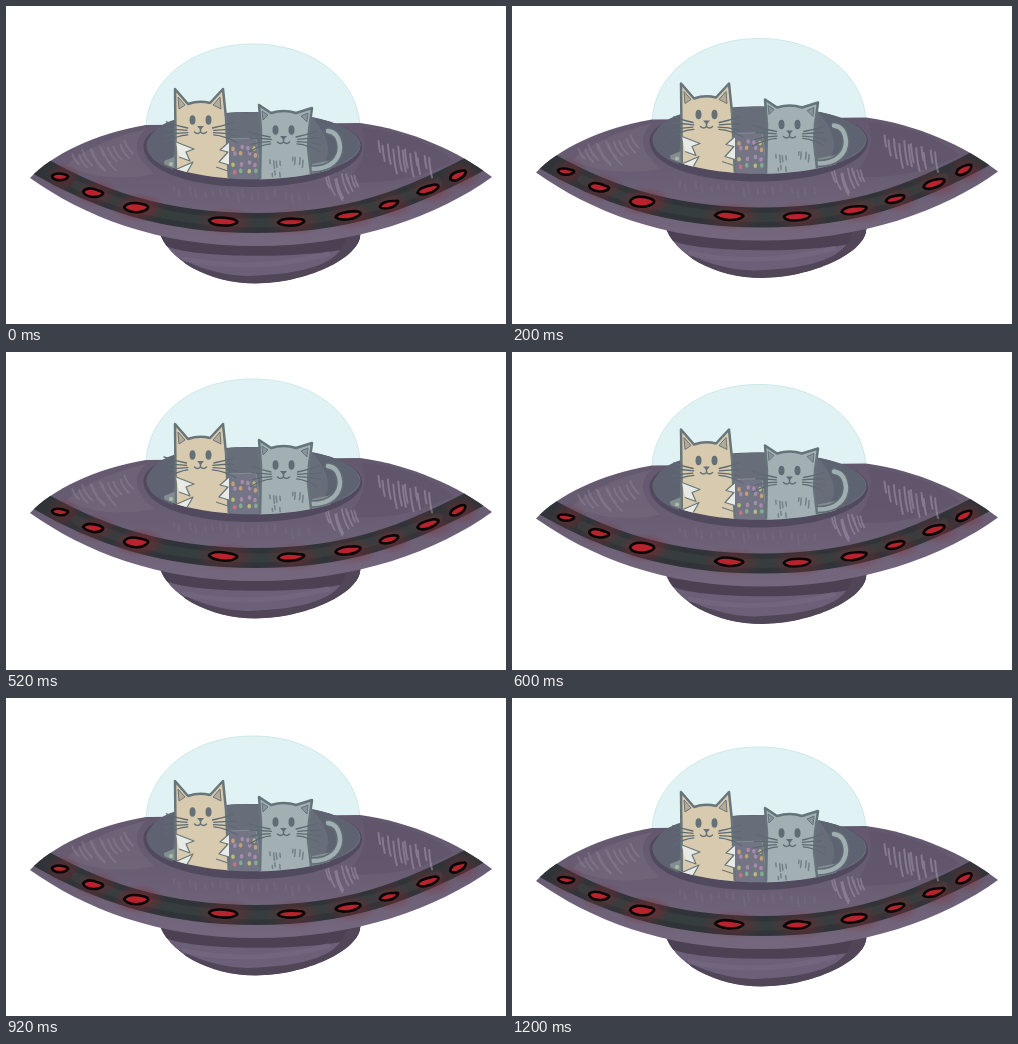
Write an HTML page that moves like this. It is 500 by 318 pixels and loops after 1.4 s.

```html
<!DOCTYPE html>
<html lang="en">
<head>
<meta charset="utf-8">
<title>Cats in a saucer</title>
<style>
  html, body { margin: 0; width: 100%; height: 100%; overflow: hidden; background: #fff; }
  svg { display: block; width: 100%; height: 100%; }
  .line { fill: none; stroke-linecap: round; stroke-linejoin: round; }
</style>
</head>
<body>
<svg viewBox="0 0 500 318">
  <defs>
    <linearGradient id="skin" x1="0" y1="0" x2="0" y2="1">
      <stop offset="0" stop-color="#63586d"/>
      <stop offset=".5" stop-color="#6a5e74"/>
      <stop offset="1" stop-color="#75687e"/>
    </linearGradient>
    <radialGradient id="glow">
      <stop offset="0" stop-color="#a01f27" stop-opacity=".75"/>
      <stop offset=".45" stop-color="#8c252d" stop-opacity=".45"/>
      <stop offset="1" stop-color="#7a2b35" stop-opacity="0"/>
    </radialGradient>
    <path id="disc" d="M24 172C45 149 90 127 140 119L354 117C405 124 452 145 486 171C432 210 350 240 250 240C150 240 78 210 24 172Z"/>
    <path id="hull" d="M153 225C161 254 203 277.500 250 277.500C300 277.500 359 251 354 225Z"/>
    <clipPath id="inDisc"><use href="#disc"/></clipPath>
    <clipPath id="inHull"><use href="#hull"/></clipPath>
    <clipPath id="inPit"><path d="M138 30H356V139.500A107 33.500 0 0 1 140 139.500Z"/></clipPath>
  </defs>
  <g id="ship">
    <path d="M140 124C140 75 186 38 247 38S354 75 354 124L350 140H144Z" fill="#e1f2f5" stroke="#cde9e9"/>

    <g clip-path="url(#inHull)">
      <use href="#hull" fill="#6c5f78"/>
      <path d="M150 222H358V238C322 253 185 254 158 239Z" fill="#4b4153"/>
      <path d="M340 232C334 258 300 268 242 270C212 269 188 260 174 252C190 273 220 282 250 281C310 280 358 255 356 225Z" fill="#504658"/>
      <path class="line" d="M178 253Q250 267 322 248" stroke="#776a82" stroke-width="5" opacity=".6"/>
    </g>

    <use href="#disc" fill="url(#skin)"/>
    <g clip-path="url(#inDisc)">
      <path d="M60 160Q85 136 140 123Q118 142 148 168Q100 178 60 160Z" fill="#776b7f" opacity=".55"/>
      <path d="M356 121Q420 130 448 155Q400 180 340 176Q366 150 356 121Z" fill="#5d5268" opacity=".55"/>
      <path class="line" d="M20 152C90 195 160 217 250 217S400 196 482 151" stroke="#303438" stroke-width="20"/>
      <path class="line" d="M70 179C125 206 190 217 250 217S382 201 432 177" stroke="#394443" stroke-width="9" opacity=".6"/>
      <g id="glows"></g>
    </g>
    <g id="shine" class="line" stroke="#a198aa"></g>

    <path d="M137.500 140C137.500 119 190 106 246 106S356 119 356 141C356 163 306 181 246 181S137.500 166 137.500 140Z" fill="#514a5e"/>
    <ellipse cx="247.500" cy="139.500" rx="107" ry="33.500" fill="#686d7a"/>
    <path d="M141 139C144 123 160 114 184 110Q166 129 167 164Q140 154 141 139Z" fill="#5f6271"/>
    <path d="M306 111Q351 120 354 140Q348 157 308 167Q337 147 306 111Z" fill="#5e6371"/>

    <g clip-path="url(#inPit)">
      <path d="M221 133L250 132L256 176H220Z" fill="#737484" stroke="#848c94"/>
      <path d="M158 155L173 149V174H160ZM306 158L326 154L322 174H304Z" fill="#848e91"/>
      <g id="knobs"></g>

      <path class="line" d="M306 163C326 163 334 152 334 141C333 130 329 126 322 125" stroke="#606c73" stroke-width="7.500"/>
      <path class="line" d="M306 163C326 163 334 152 334 141C333 130 329 126 322 125" stroke="#a0aeb1" stroke-width="4.500"/>

      <g stroke="#68757a" stroke-width="2.500" stroke-linejoin="round">
        <path d="M170 176L169 83L182 98Q193 94 204 97L217 83L220 112L223 176Z" fill="#d8caae"/>
        <path d="M172 91L179 99L173 103ZM214 91L207 99L215 103Z" fill="#b3aa9b" stroke-width="1"/>
        <path d="M170 136L188 143L180 146L184 155L173 151M223 136L214 144L222 146L213 156L223 159" fill="#e8ebe5" stroke-width="1.200"/>
        <path d="M171 163L187 156L179 170M222 165L210 161" fill="#e8ebe5" stroke-width="1.200"/>
      </g>
      <g stroke="#65747a" stroke-width="2.500" stroke-linejoin="round">
        <path d="M254 176L255 124L253 99L265 107Q278 103 290 107L306 102L303 124L302 142L306 176Z" fill="#a2b0b3"/>
        <path d="M256 105L262 109L257 114ZM302 107L295 110L301 116Z" fill="#85949a" stroke-width="1"/>
      </g>
      <g id="faces"></g>
      <path class="line" id="fur" stroke="#738287" stroke-width="1.500"/>
    </g>
    <path class="line" id="whiskers" stroke="#5d6a72" stroke-width="1.300"/>
    <g id="lamps"></g>
  </g>
</svg>
<script>
const el = id => document.getElementById(id);
const STEP = 200, STEPS = 7, RISE = 5.5;
// x, y, half width, half height, tilt
const lamps = [
  [54, 171, 8, 3.2, 4], [87, 187, 10, 3.9, 8], [130, 201.5, 12, 4.7, 2],
  [217, 215.5, 14, 4, 4], [285, 216, 13, 3.7, -3], [342, 209.5, 12.5, 3.8, -8],
  [383, 198.5, 9.5, 3.4, -14], [422, 183.5, 11, 3.7, -17], [452, 169.5, 8.5, 3.7, -27]
];

function random(seed) {
  return () => {
    seed = (seed * 16807) % 2147483647;
    return seed / 2147483647;
  };
}

function hatch(x, y, count, dx, dy, length, lean, seed) {
  const r = random(seed);
  let marks = "";
  for (let i = 0; i < count; i++) {
    const size = length * (.5 + r() * .6);
    const px = x + dx * i + r() * 4, py = y + dy * i + r() * 5;
    marks += `M${px} ${py}q${lean * size * .3} ${size * .6} ${lean * size} ${size}`;
  }
  return marks;
}

function face(x, y, color) {
  return `<g fill="${color}">
    <ellipse cx="${x - 8}" cy="${y}" rx="3" ry="4.700"/>
    <ellipse cx="${x + 8}" cy="${y}" rx="3" ry="4.700"/>
    <path d="M${x - 3.5} ${y + 6}h7l-3.500 4z"/></g>
    <path class="line" stroke="${color}" stroke-width="1.500"
      d="M${x} ${y + 9}v3q-3 3 -6 0m6 0q3 3 6 0"/>`;
}

function drawFixed() {
  el("glows").innerHTML = lamps.map(([x, y, w], i) =>
    `<ellipse cx="${x + 3}" cy="${y}" rx="${w * 2.3}" ry="15" fill="url(#glow)" opacity="${i === 2 ? 1 : .65}"/>`).join("");
  el("shine").innerHTML =
    `<path d="${hatch(66, 146, 11, 5, -1.2, 20, .65, 31)}" stroke-width="2" opacity=".28"/>
     <path d="${hatch(372, 134, 12, 4.4, 1.5, 22, .15, 77)}" stroke-width="2" opacity=".55"/>
     <path d="${hatch(318, 170, 9, 3.8, -.5, 20, .35, 19)}" stroke-width="1.800" opacity=".5"/>
     <path d="${hatch(164, 181, 18, 8, .2, 9, .1, 53)}" stroke-width="2" opacity=".1"/>`;

  const r = random(91), colors = ["#c77482", "#b7bd76", "#7fae90", "#c2a077", "#a78bac"];
  let knobs = "";
  for (let i = 0; i < 16; i++) {
    knobs += `<ellipse cx="${227 + i % 4 * 7 + r() * 3}" cy="${139 + Math.floor(i / 4) * 8 + r() * 4}"
      rx="1.800" ry="2.300" fill="${colors[Math.floor(r() * 5)]}"/>`;
  }
  el("knobs").innerHTML = knobs + '<circle cx="319" cy="163" r="2" fill="#b7bd76"/><circle cx="165" cy="158" r="2" fill="#a9bda5"/>';
  el("faces").innerHTML = face(194.5, 114, "#667177") + face(277.5, 124, "#5e6d75");
  el("fur").setAttribute("d", hatch(261, 150, 4, 3, .5, 7, .1, 13) +
    hatch(286, 147, 4, 3, 1, 7, -.1, 17) + hatch(263, 163, 3, 4, 0, 6, .1, 29));
}

function lampShape([x, y, w, h, tilt], r) {
  const j = () => (r() - .5) * 1.2;
  const d = `M${-w} ${j()}C${-w * .8} ${-h + j()} ${-w * .2} ${-h * 1.2 + j()} ${w * .6} ${-h * .8 + j()}
    Q${w * 1.1} ${-h * .5} ${w} ${j()}Q${w * .7} ${h + j()} ${j()} ${h}Q${-w * .8} ${h + j()} ${-w} 0Z`;
  return `<path transform="translate(${x} ${y}) rotate(${tilt})" d="${d}"
    fill="#b8232d" stroke="#090708" stroke-width="2.600" stroke-linejoin="round"/>`;
}

function whiskers(x, y, r) {
  let d = "";
  for (const side of [-1, 1]) {
    for (let i = 0; i < 4; i++) {
      const start = x + side * (12 + r() * 2), reach = side * (19 + r() * 5);
      d += `M${start} ${y + i * 2.3}q${reach / 2} ${i - 2} ${reach} ${(i - 1.4) * 4.5 + r()}`;
    }
  }
  return d;
}

function draw(ms) {
  const step = Math.floor(ms / STEP) % STEPS;
  // Triangle wave: up two steps, back, then down two
  const level = step < 4 ? Math.abs(step - 2) - 2 : step - 4;
  const r = random(4021 + level * 367);
  el("ship").setAttribute("transform", `translate(0 ${level * RISE})`);
  el("lamps").innerHTML = lamps.map(lamp => lampShape(lamp, r)).join("");
  el("whiskers").setAttribute("d", whiskers(194, 122, r) + whiskers(278, 131, r));
}

drawFixed();
draw(0);
const start = performance.now();
let last = 0;
function tick() {
  const ms = performance.now() - start;
  const step = Math.floor(ms / STEP);
  if (step !== last) draw(ms);
  last = step;
  requestAnimationFrame(tick);
}
requestAnimationFrame(tick);
</script>
</body>
</html>
```
